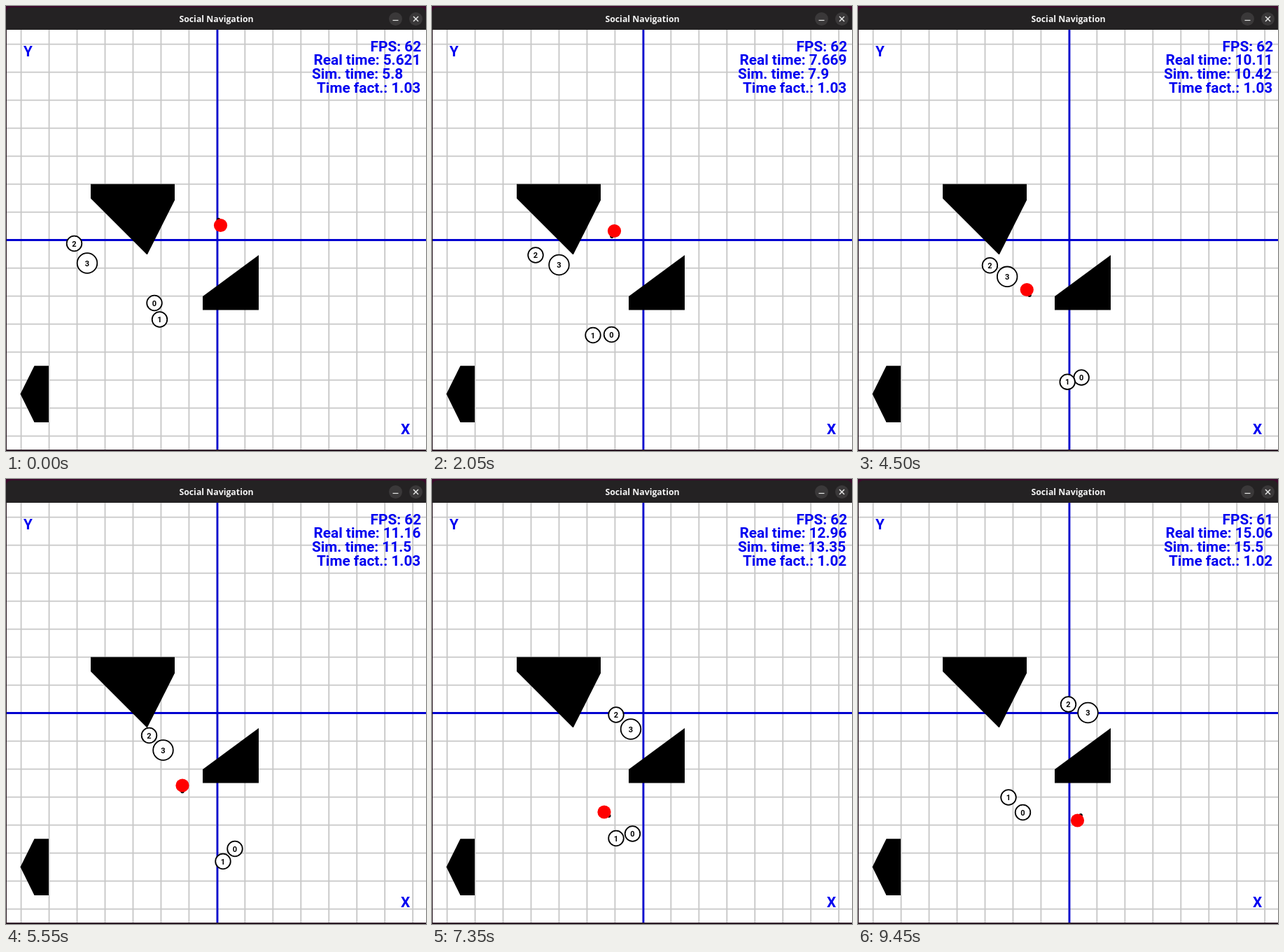
Animation of 600 by 636 pixels, one loop 9500 ms. Source, as an HTML page with a canvas:

```html
<!DOCTYPE html>
<html lang="en">
<head>
<meta charset="utf-8">
<title>Social Navigation</title>
<style>
  html, body { margin: 0; width: 100%; height: 100%; overflow: hidden; }
  canvas { display: block; }
</style>
</head>
<body>
<canvas id="stage" width="600" height="636"></canvas>
<script>
const ctx = document.getElementById('stage').getContext('2d');
const LOOP = 9500, STEP = 50;
const BLUE = '#0000f0', DARK = '#2b1a25';
const ROBOT_SPEED = 35;

// Every agent passes its way points at these seconds
const times = [0, 2.05, 3.5, 5.55, 7.35, 8.55, 9.45];
const humans = [
  [[212, 424.5], [256.5, 469.5], [289.5, 512.5], [327, 528.5], [286.5, 507], [256.5, 502], [235.5, 476.5]],
  [[219.5, 448], [230, 470.5], [264.5, 507], [310, 546.5], [263, 513.5], [233.5, 482], [215, 455]],
  [[97.5, 339.5], [148, 356], [178.5, 364], [204.5, 366.5], [263, 337], [299, 321], [300.5, 322]],
  [[116, 367.5], [181.5, 370], [209, 376], [224.5, 387.5], [284, 357.5], [320.5, 341], [328.5, 334]]
];
const robot = [[306.5, 313.5], [260.5, 321.5], [235.5, 375], [252, 438], [246, 476], [287.5, 496.5], [313.5, 488]];
const headings = [250, 114, 104, 90, 38, 12, -57];

const obstacles = [
  [[121, 254.4], [241, 254.4], [241, 277.5], [202, 355], [201, 355], [121, 275]],
  [[361, 356], [361, 434.5], [281, 434.5], [281, 415]],
  [[61, 514.3], [61, 595], [40.5, 595], [20.5, 554.5], [40.5, 514.3]]
];

function legAt(t) {
  let i = 0;
  while (i < times.length - 2 && t >= times[i + 1]) i++;
  return i;
}

const chordSpeed = (path, i, axis) => {
  const leg = Math.min(Math.max(i, 0), times.length - 2);
  return (path[leg + 1][axis] - path[leg][axis]) / (times[leg + 1] - times[leg]);
};

// Cubic Hermite curve; returns position and slope
function hermite(a, b, va, vb, s) {
  const gap = b - a, c2 = 3 * gap - 2 * va - vb, c3 = va + vb - 2 * gap;
  return [a + s * (va + s * (c2 + s * c3)), va + s * (2 * c2 + 3 * s * c3)];
}

function move(path, t, axis, speedIn, speedOut) {
  const i = legAt(t), d = times[i + 1] - times[i];
  return hermite(path[i][axis], path[i + 1][axis], speedIn(i) * d, speedOut(i) * d, (t - times[i]) / d);
}

// A walker keeps the pace of the last leg and eases into that of the next
const walk = (path, t, axis) =>
  move(path, t, axis, i => chordSpeed(path, i - 1, axis), i => chordSpeed(path, i + 1, axis))[0];

// The robot drives along its heading
function drive(t, axis) {
  const speed = i => ROBOT_SPEED * [Math.cos, Math.sin][axis](headings[i] * Math.PI / 180);
  return move(robot, t, axis, speed, i => speed(i + 1));
}

function disc(x, y, r, fill, stroke) {
  ctx.beginPath();
  ctx.arc(x, y, r, 0, 2 * Math.PI);
  ctx.fillStyle = fill;
  ctx.fill();
  if (stroke) {
    ctx.strokeStyle = stroke;
    ctx.lineWidth = 1.8;
    ctx.stroke();
  }
}

function line(x1, y1, x2, y2, color, width) {
  ctx.strokeStyle = color;
  ctx.lineWidth = width;
  ctx.beginPath();
  ctx.moveTo(x1, y1);
  ctx.lineTo(x2, y2);
  ctx.stroke();
}

function cross(x, y, color, width) {
  line(x, 34, x, 634, color, width);
  line(0, y, 600, y, color, width);
}

function text(str, x, y, font, color, align = 'left') {
  ctx.font = font;
  ctx.fillStyle = color;
  ctx.textAlign = align;
  ctx.fillText(str, x, y);
}

const label = (str, x, y) => text(str, x, y, 'bold 20.8px Roboto, sans-serif', BLUE);

function drawWindow() {
  ctx.fillStyle = '#3b0a2b';
  ctx.fillRect(0, 0, 600, 20);
  ctx.fillStyle = '#242223';
  ctx.beginPath();
  ctx.roundRect(0, 2, 600, 40, [8, 8, 0, 0]);
  ctx.fill();
  text('Social Navigation', 300.5, 23, 'bold 12.3px "Open Sans", sans-serif', '#f4f4f4', 'center');
  for (const x of [556.5, 585.5]) disc(x, 18.5, 9.5, '#3a3839');
  line(552.5, 20.5, 560.5, 20.5, '#e8e8e8', 1.2);
  line(582, 15, 589, 22, '#e8e8e8', 1.4);
  line(589, 15, 582, 22, '#e8e8e8', 1.4);
  ctx.fillStyle = '#fff';
  ctx.fillRect(0, 34, 600, 600);
}

function drawWorld() {
  for (let k = 0; k < 15; k++) cross(21.6 + 39.97 * k, 54.6 + 40 * k, '#c8c8c8', 1.9);
  cross(302, 334.5, '#0000d0', 2.8);
  ctx.fillStyle = DARK;
  ctx.fillRect(0, 634, 600, 2);
  ctx.fillRect(0, 34, 1, 600);
  ctx.fillStyle = '#000';
  for (const corners of obstacles) {
    ctx.beginPath();
    for (const [x, y] of corners) ctx.lineTo(x, y);
    ctx.fill();
  }
  label('Y', 25, 72.3);
  label('X', 564, 612.3);
}

function drawAgents(t) {
  humans.forEach((path, id) => {
    const x = walk(path, t, 0), y = walk(path, t, 1);
    disc(x, y, id === 3 ? 14.3 : 10.8, '#fff', '#000');
    text(id, x, y + 4, 'bold 11px Roboto, sans-serif', '#000', 'center');
  });
  const [x, vx] = drive(t, 0), [y, vy] = drive(t, 1);
  const heading = Math.atan2(vy, vx);
  disc(x + 8.6 * Math.cos(heading), y + 8.6 * Math.sin(heading), 2.7, '#000');
  disc(x, y, 9.6, '#f00');
}

function drawStats(t) {
  const digits = v => String(+v.toFixed(3)).slice(0, 5);
  const real = 5.621 + 0.9989 * t;
  const sim = Math.round((5.8 + 1.0265 * t) / 0.025) * 0.025;
  label('FPS: ' + (t < 9 ? 62 : 61), 520.6, 64.6);
  label('Real time: ' + digits(real), 439.5, 84.3);
  label('Sim. time: ' + digits(sim), 437, 104.3);
  label('Time fact.: ' + Math.floor(sim / real * 100) / 100, 444, 124);
}

function frame(now) {
  const t = Math.floor(now % LOOP / STEP) * STEP / 1000;
  drawWindow();
  drawWorld();
  drawAgents(t);
  drawStats(t);
  requestAnimationFrame(frame);
}
requestAnimationFrame(frame);
</script>
</body>
</html>
```
